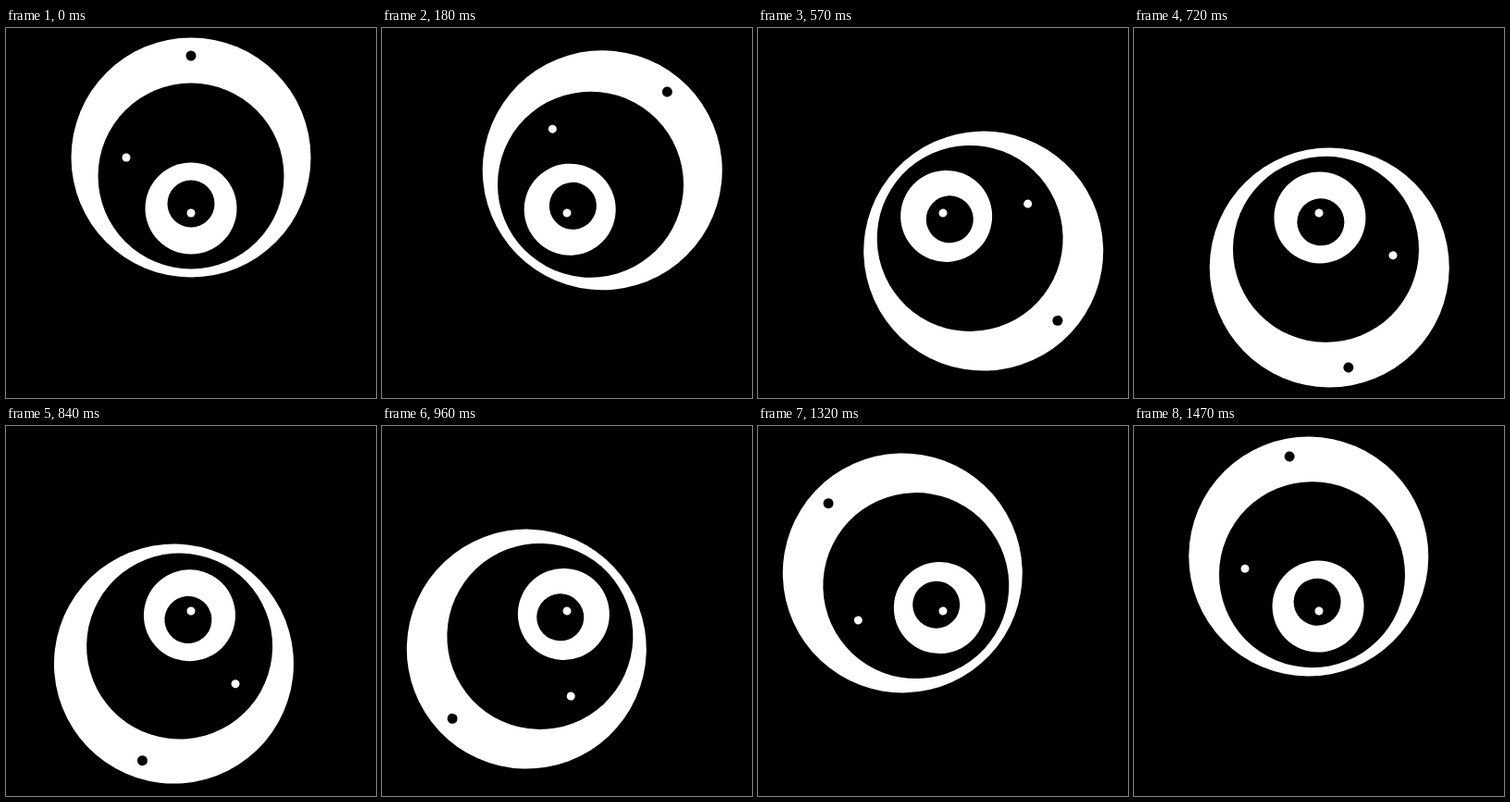
These frames come from a looping animation (400x400 px, 1.5 s). An HTML page:

```html
<!DOCTYPE html>
<html lang="en">
<head>
<meta charset="utf-8">
<title>Rolling circles</title>
<style>
  html, body { margin: 0; width: 100%; height: 100%; overflow: hidden; background: #000; }
  svg { display: block; width: 100vw; height: 100vh; }
</style>
</head>
<body>
<svg viewBox="0 0 400 400">
  <rect width="400" height="400"/>
  <g id="wheel" fill="#fff">
    <circle cx="200" cy="140" r="129.5"/>
    <circle cx="200" cy="30" r="5.5" fill="#000"/>
    <circle cx="200" cy="160" r="100.5" fill="#000"/>
    <circle cx="130" cy="140" r="4.5"/>
    <circle cx="200" cy="195" r="49.5"/>
    <circle cx="200" cy="190" r="25.5" fill="#000"/>
    <circle cx="200" cy="200" r="4.5"/>
  </g>
</svg>
<script>
  const LOOP = 1500, STEP = 30, TURN = 360 * STEP / LOOP;
  const wheel = document.getElementById('wheel');
  const start = performance.now();

  // The first step covers half a turn unit; the rest are even.
  function draw(now) {
    const t = Math.max(0, now - start) % LOOP;
    const step = Math.floor(t / STEP + 0.001);
    const angle = Math.max(0, step - 0.5) * TURN;
    wheel.setAttribute('transform', `rotate(${angle} 200 200)`);
    requestAnimationFrame(draw);
  }
  draw(start);
</script>
</body>
</html>
```
